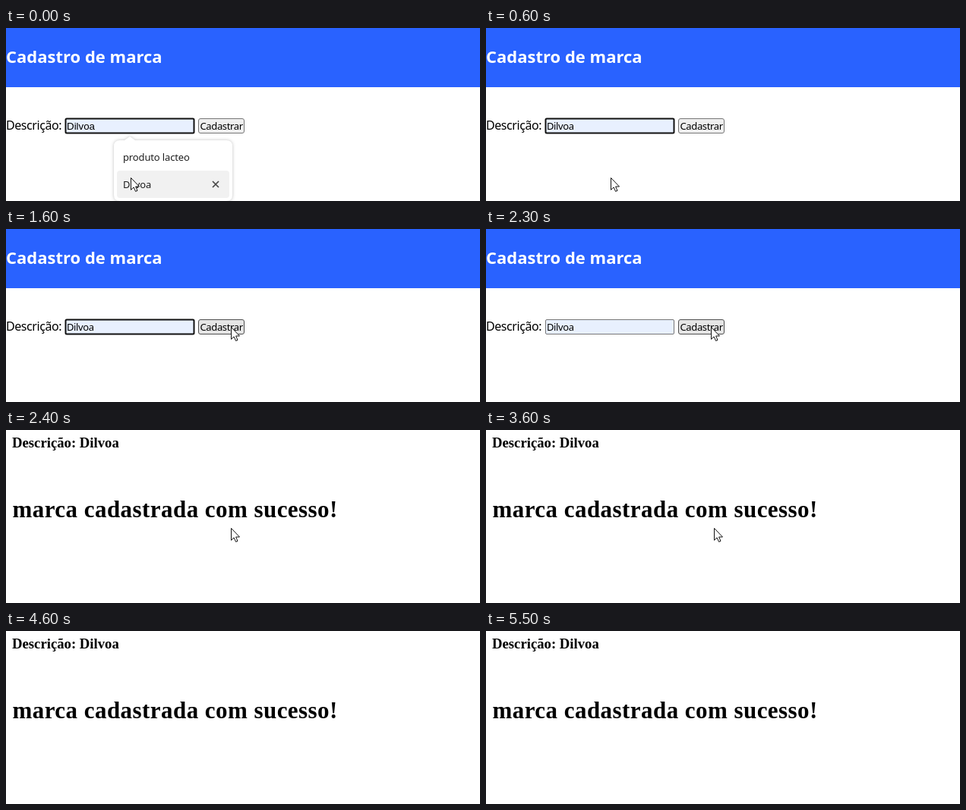
An HTML page for the animation above (7200 ms loop, 624x228 px).

```html
<!DOCTYPE html>
<html lang="pt">
<head>
<meta charset="utf-8">
<title>Cadastro de marca</title>
<style>
  html, body { margin: 0; width: 100%; height: 100%; overflow: hidden; background: #fff; }
  svg { display: block; }
  text { font-family: "Noto Sans", sans-serif; white-space: pre; }
  .title { font-size: 22px; font-weight: 700; fill: #fff; }
  .label { font-size: 16px; letter-spacing: -.43px; }
  .control { font-size: 13px; letter-spacing: -.37px; }
  .preview { font: 13.33px "Liberation Sans", sans-serif; }
  .option { font-size: 13px; letter-spacing: -.14px; fill: #1f1f1f; }
  #done text { font-family: "Liberation Serif", serif; font-weight: 700; }
  .detail { font-size: 18.72px; }
  .result { font-size: 31px; letter-spacing: .45px; }
  #field { fill: #e8f0fe; stroke: #767676; }
  #field.focus { stroke: #101010; stroke-width: 2px; }
  #button { fill: #efefef; stroke: #767676; }
  #button.hover { fill: #e5e5e5; stroke: #4f4f4f; }
  .panel { filter: drop-shadow(0 0 2px rgba(0, 0, 0, .25)); }
</style>
</head>
<body>
<svg width="624" height="228" viewBox="0 0 624 228">
  <g id="form">
    <rect width="624" height="78" fill="#2962ff"/>
    <text class="title" x="0" y="46">Cadastro de marca</text>
    <text class="label" x="0" y="134">Descrição:</text>
    <rect id="field" x="78.5" y="119.5" width="169" height="19" rx="1.5"/>
    <text id="value" x="80" y="134">Dilvoa</text>
    <rect id="button" x="253.5" y="119.5" width="60" height="19" rx="2.5"/>
    <text class="control" x="255.5" y="134">Cadastrar</text>
  </g>
  <g id="menu">
    <path class="panel" fill="#fff" d="M150 148h6l7-5 7 5h120q8 0 8 8v64q0 8-8 8H150q-8 0-8-8v-64q0-8 8-8z"/>
    <rect x="146" y="188" width="148" height="36" rx="4" fill="#f1f1f1"/>
    <text class="option" x="154" y="175">produto lacteo</text>
    <text class="option" x="154" y="211">Dilvoa</text>
    <path d="M272 202l8 8m0-8l-8 8" stroke="#474747" stroke-width="1.7"/>
  </g>
  <g id="done">
    <text class="detail" x="8" y="23">Descrição: Dilvoa</text>
    <text class="result" x="8.5" y="115">marca cadastrada com sucesso!</text>
  </g>
  <path id="cursor" d="M.5 .5V16.3L4.1 12.9 6.6 18.4 9 17.3 6.6 12H11.5Z" fill="#fff" stroke="#111"/>
</svg>
<script>
const LOOP = 7200, TICK = 100;
const MENU_CLOSE = 600, HOVER = 1300, PRESS = 2300, SAVED = 2400, NUDGE = 3600;

const $ = id => document.getElementById(id);
const show = (id, on) => $(id).style.visibility = on ? "visible" : "hidden";
const progress = (t, from, to) => Math.min(1, Math.max(0, (t - from) / (to - from)));
const easeIn = (p, power) => p ** power;
const easeOut = (p, power) => 1 - (1 - p) ** power;

// Glides to the button, rests, then sweeps off the top right corner
function pointer(t) {
  const arrive = progress(t, 800, 1600), leave = progress(t, 3900, 4540);
  const nudge = t >= NUDGE ? 4 : 0;
  return [
    164 + 132 * easeOut(arrive, 6) + nudge + 340 * easeIn(leave, 2),
    197 - 68 * easeOut(arrive, 2) - 165 * easeIn(leave, 6)
  ].map(Math.round);
}

function draw(t) {
  show("form", t < SAVED);
  show("menu", t < MENU_CLOSE);
  show("done", t >= SAVED);
  $("field").classList.toggle("focus", t < PRESS);
  $("button").classList.toggle("hover", t >= HOVER);
  $("value").setAttribute("class", t < MENU_CLOSE ? "preview" : "control");
  $("cursor").setAttribute("transform", `translate(${pointer(t)})`);
}

const start = performance.now();
function frame() {
  const t = (performance.now() - start) % LOOP;
  draw(Math.floor(t / TICK) * TICK);
  requestAnimationFrame(frame);
}
frame();
</script>
</body>
</html>
```
